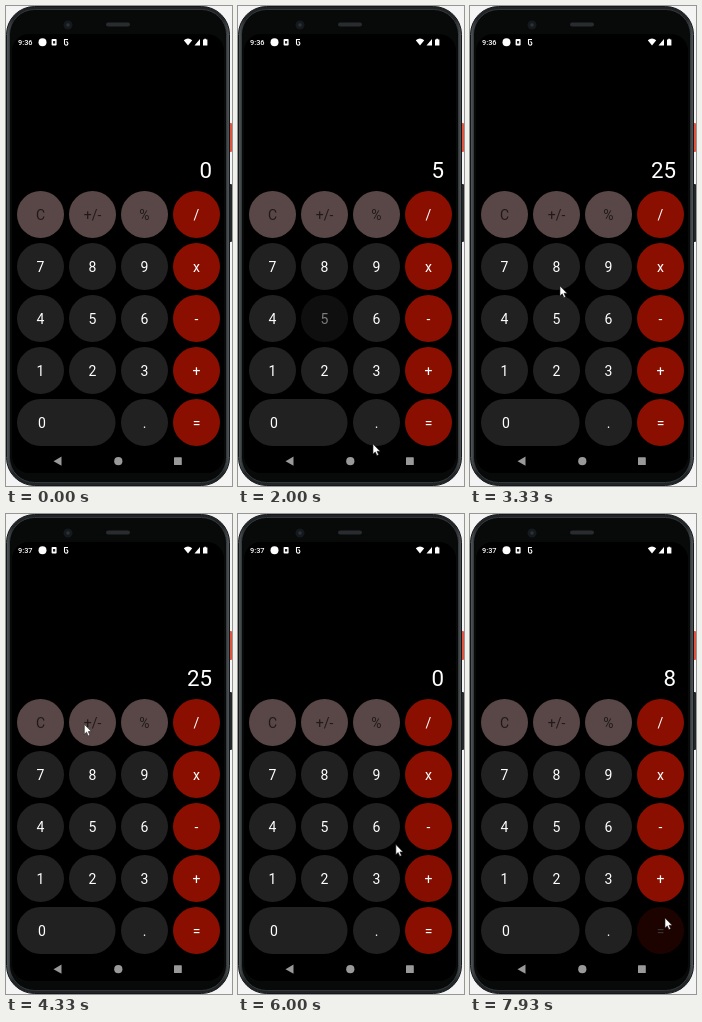
An HTML page for the animation above (8 s loop, 226 by 480 pixels).

```html
<!DOCTYPE html>
<html lang="en">
<head>
<meta charset="utf-8">
<title>Calculator</title>
<style>
  html, body { margin: 0; width: 100%; height: 100%; overflow: hidden; background: #f4f4f4; }
  svg { display: block; width: 226px; height: 480px; }
  text { font-family: Roboto, sans-serif; fill: #fff; }
  .key text { font-size: 14px; text-anchor: middle; }
  #display { font-size: 22.3px; text-anchor: end; }
  #clock { font-size: 7.4px; font-weight: 500; }
</style>
</head>
<body>
<svg id="stage" viewBox="0 0 226 480">
  <defs>
    <linearGradient id="rim" x2="1" y2="0">
      <stop offset="0" stop-color="#53585b"/>
      <stop offset=".03" stop-color="#202426"/>
      <stop offset=".97" stop-color="#202426"/>
      <stop offset="1" stop-color="#53585b"/>
    </linearGradient>
  </defs>
  <!-- phone body -->
  <rect x="221" y="117" width="5" height="29" rx="1" fill="#e0533f"/>
  <rect x="221" y="178" width="5" height="58" rx="1" fill="#24272a"/>
  <rect x=".5" y=".5" width="223" height="479" rx="28" fill="url(#rim)" stroke="#15181a"/>
  <rect x="3.5" y="3.5" width="217" height="473" rx="25" fill="#080909" stroke="#3c4143" stroke-width=".8"/>
  <rect x="6" y="28" width="212" height="439" rx="17" fill="#000"/>
  <rect x="100" y="16.5" width="24" height="4" rx="2" fill="#292c2e"/>
  <circle cx="62" cy="19" r="4.5" fill="#16191c"/>
  <circle cx="62" cy="19" r="1.8" fill="#29313a"/>
  <!-- status bar -->
  <text id="clock" x="12" y="38.8">9:36</text>
  <g fill="#fff">
    <circle cx="36.5" cy="36.2" r="4"/>
    <rect x="45.6" y="33" width="5" height="6.6" rx=".8"/>
    <path d="M47 35h2.2v2.6H47z" fill="#222"/>
    <path d="M58 33.5h4M58.5 33v4.5a1.7 1.7 0 1 0 1.7-1.7" fill="none" stroke="#fff" stroke-width="1.1"/>
    <path d="M177.8 34.2Q182 31 186.2 34.2L182 39.6Z"/>
    <path d="M188.5 39.6h5.5v-6.6z"/>
    <path d="M197 33.6h1.2v-.8h2v.8h1.2v6H197z"/>
  </g>
  <text id="display" x="206" y="172">0</text>
  <g id="keys"></g>
  <!-- navigation bar -->
  <g fill="#999">
    <path d="M47.5 455.2l8-4.6v9.2z"/>
    <circle cx="112.3" cy="455.2" r="4.1"/>
    <rect x="168" y="451.3" width="7.8" height="7.8" rx=".6"/>
  </g>
  <path id="cursor" d="M0 0V10L2.3 7.9 3.9 11.6 5.6 10.8 4 7.3H7.1Z" fill="#fff" stroke="#222" stroke-width=".6"/>
</svg>
<script>
  const LOOP = 8000, TICK = 200 / 3;
  const NS = 'http://www.w3.org/2000/svg';
  const byId = id => document.getElementById(id);
  const keys = {};

  function add(parent, tag, attrs, text) {
    const node = document.createElementNS(NS, tag);
    for (const name in attrs) node.setAttribute(name, attrs[name]);
    if (text) node.textContent = text;
    return parent.appendChild(node);
  }

  function addKey(label, column, row) {
    const wide = label === '0';
    const x = 11 + column * 52, y = 185 + row * 52;
    const operator = column === 3, top = row === 0 && !operator;
    const group = add(byId('keys'), 'g', { class: 'key' });
    add(group, 'rect', {
      x, y, width: wide ? 98.5 : 47, height: 47, rx: 23.5,
      fill: operator ? '#8b0f00' : top ? '#594747' : '#212121'
    });
    add(group, 'text', {
      x: x + (wide ? 25 : 23.5), y: y + 28.6,
      style: top ? 'fill:#211919' : ''
    }, label);
    keys[label] = group;
  }

  [['C', '+/-', '%', '/'], ['7', '8', '9', 'x'], ['4', '5', '6', '-'],
   ['1', '2', '3', '+'], ['0', '', '.', '=']].forEach((labels, row) =>
    labels.forEach((label, column) => label && addKey(label, column, row)));

  // key, press time, release time, value shown on release
  const presses = [
    ['5', 560, 650, '5'], ['x', 1120, 1250, '0'], ['5', 1790, 1900, '5'],
    ['=', 2370, 2480, '25'], ['+/-', 4600, 4710, '-25'], ['+', 5670, 5780, '0'],
    ['8', 6720, 6840, '8'], ['=', 7840, 8100, '8']
  ];

  // time, x, y of the pointer tip
  const path = [
    [60, 224, 330], [330, 120, 322], [500, 88, 315], [600, 88, 315],
    [860, 165, 272], [1000, 190, 262], [1130, 190, 262], [1270, 167, 331],
    [1550, 92, 317], [1790, 88, 315], [2000, 135, 438], [2080, 150, 447],
    [2260, 190, 420], [2430, 190, 420], [2800, 155, 360], [3330, 90, 280],
    [3480, 81, 262], [3850, 36, 222], [4050, 24, 213], [4400, 84, 210],
    [4660, 84, 210], [5100, 150, 310], [5460, 191, 363], [5720, 191, 363],
    [6150, 145, 318], [6580, 84, 262], [6820, 84, 262], [7400, 172, 385],
    [7720, 195, 404], [8000, 195, 404]
  ];

  const smooth = p => p * p * (3 - 2 * p);
  const clamp = p => Math.max(0, Math.min(1, p));

  function pointerAt(time) {
    const i = path.findIndex(point => point[0] > time);
    const [t0, x0, y0] = path[i - 1], [t1, x1, y1] = path[i];
    const p = smooth((time - t0) / (t1 - t0));
    return [x0 + (x1 - x0) * p, y0 + (y1 - y0) * p];
  }

  function render(time) {
    let value = '0';
    for (const label in keys) keys[label].setAttribute('opacity', 1);
    for (const [label, down, up, result] of presses) {
      if (time < down) break;
      const fade = time < up
        ? 1 - clamp((time - down) / 60)
        : smooth(clamp((time - up) / 250));
      keys[label].setAttribute('opacity', .2 + .8 * fade);
      if (time >= up) value = result;
    }
    byId('display').textContent = value;
    byId('clock').textContent = time < 4000 ? '9:36' : '9:37';

    const visible = time >= path[0][0];
    byId('cursor').setAttribute('visibility', visible ? 'visible' : 'hidden');
    if (visible) byId('cursor').setAttribute('transform', `translate(${pointerAt(time)})`);
  }

  const start = performance.now();
  function frame() {
    const time = (performance.now() - start) % LOOP;
    render(Math.floor((time + 4) / TICK) * TICK % LOOP);
    requestAnimationFrame(frame);
  }
  frame();
</script>
</body>
</html>
```
